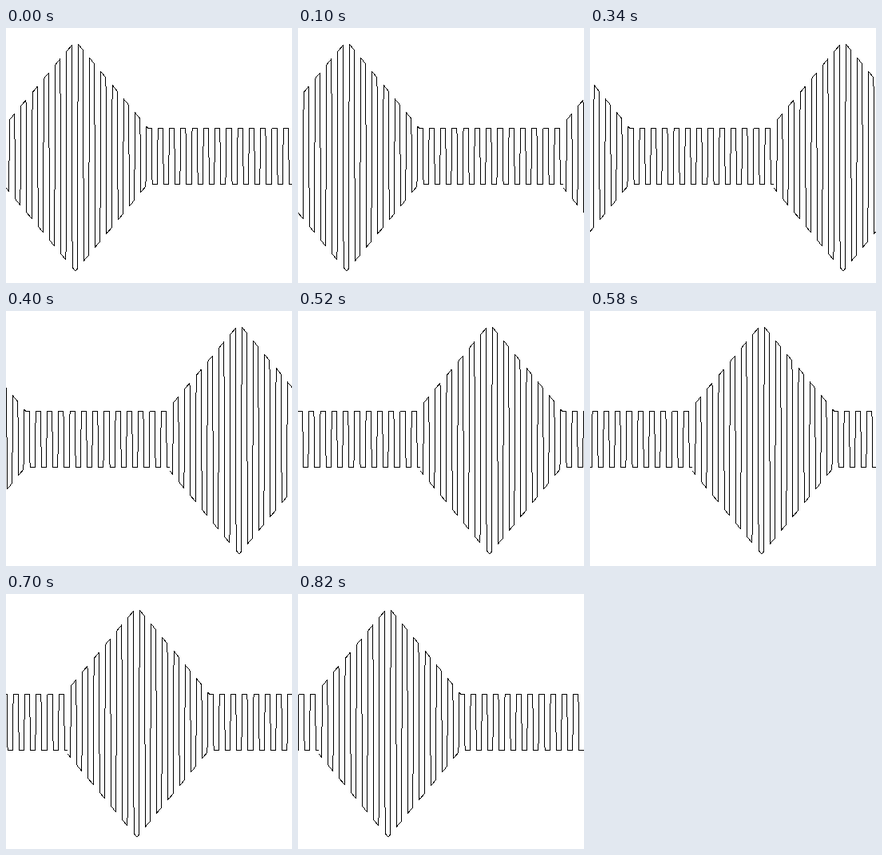
These frames come from a looping animation (358 px wide and 319 px high, 880 ms). An HTML page with a canvas:

```html
<!DOCTYPE html>
<html lang="en">
<head>
<meta charset="utf-8">
<title>Scrolling square wave</title>
<style>
  html, body { margin: 0; width: 100%; height: 100%; overflow: hidden; background: #fff; }
  canvas { display: block; }
</style>
</head>
<body>
<canvas id="stage" width="358" height="319"></canvas>
<script>
const W = 358, H = 319, STEPS = 14, LOOP = 880;
const FIRST_HOLD = 100, HOLD = 60;
const SAMPLES = 350, PERIOD = 14, MID = 159.6;

const ctx = document.getElementById('stage').getContext('2d');
const wave = document.createElement('canvas');
wave.width = W;
wave.height = H;
const pen = wave.getContext('2d');

// Flat amplitude with a triangular burst on the left.
const amplitude = i => Math.max(35, 144 - 1.2245 * Math.abs(i - 84.6));

function samplePoint(i) {
  const phase = i % PERIOD;
  const sign = phase >= 4 && phase <= 10 ? -1 : 1;
  return [i * (W - 1) / SAMPLES, MID + sign * amplitude(i)];
}

// Crisp one-pixel line between fractional points, one pixel per step of the longer axis.
function pixelLine(a, b) {
  const major = Math.abs(b[1] - a[1]) > Math.abs(b[0] - a[0]) ? 1 : 0;
  if (a[major] > b[major]) [a, b] = [b, a];
  const last = Math.round(b[major]);
  for (let m = Math.round(a[major]); m <= last; m++) {
    const t = Math.min(1, Math.max(0, (m - a[major]) / (b[major] - a[major])));
    const n = Math.round(a[1 - major] + (b[1 - major] - a[1 - major]) * t);
    if (major) pen.fillRect(n, m, 1, 1);
    else pen.fillRect(m, n, 1, 1);
  }
}

pen.fillStyle = '#000';
for (let i = 0; i < SAMPLES; i++) pixelLine(samplePoint(i), samplePoint(i + 1));

function draw(time) {
  const t = time % LOOP;
  const step = t < FIRST_HOLD ? 0 : 1 + Math.floor((t - FIRST_HOLD) / HOLD);
  const shift = Math.round(step * W / STEPS);
  ctx.fillStyle = '#fff';
  ctx.fillRect(0, 0, W, H);
  ctx.drawImage(wave, -shift, 0);
  ctx.drawImage(wave, W - shift, 0);
}

const start = performance.now();
function tick() {
  draw(performance.now() - start);
  requestAnimationFrame(tick);
}
tick();
</script>
</body>
</html>
```
